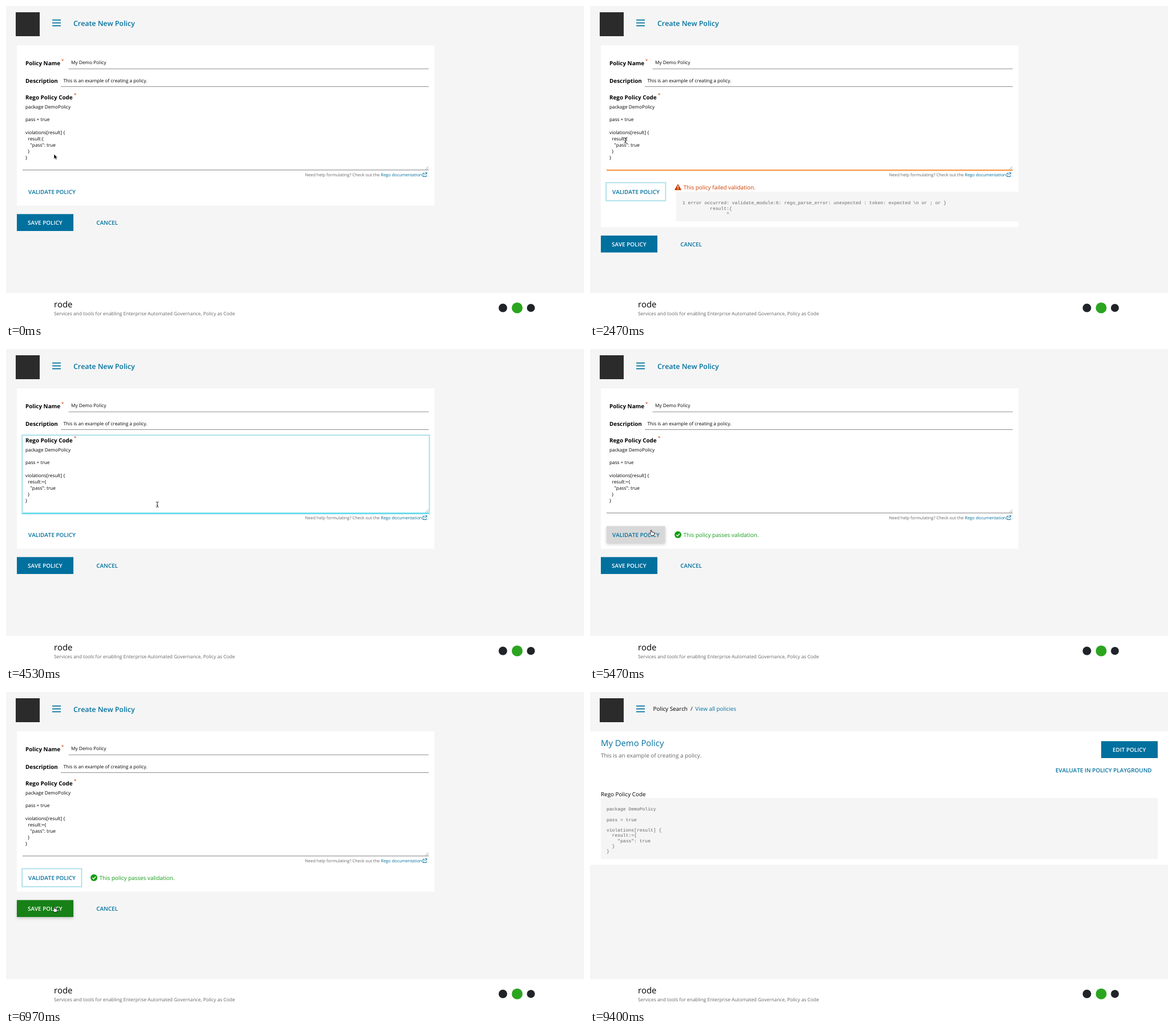
An HTML page that plays this animation: 1012 by 553 pixels, repeating every 9.51 s.

```html
<!DOCTYPE html>
<html lang="en">
<head>
<meta charset="utf-8">
<title>Create New Policy</title>
<style>
  html, body { margin: 0; height: 100%; overflow: hidden; background: #f5f5f5; }
  svg { display: block; width: 100vw; height: 100vh; }
  text { font: 9.89px "Open Sans", sans-serif; font-kerning: none; white-space: pre; text-rendering: geometricPrecision; }
  .label { font-weight: 700; }
  .button { font-weight: 600; }
  .title { font-size: 12.36px; font-weight: 600; }
  .large { font-size: 14.83px; }
  .input { font-size: 8.24px; }
  .hint { font-size: 7.42px; }
  .tagline { font-size: 8.4px; }
  .code { font: 8.03px "Liberation Mono", monospace; }
  .raised { filter: drop-shadow(0 2.5px 2.5px rgba(0, 0, 0, .2)); }
</style>
</head>
<body>
<svg id="stage" viewBox="0 0 1012 553"></svg>
<script>
const DURATION = 9510;
const BLUE = '#00709e', GREY = '#666', RED = '#cc3d00', GREEN = '#149b14', RING = '#a9dfea', RULE = '#808080';

// Moments of the interaction, in ms
const FAILED = 850, FOCUSED = 2650, EDITED = 3400, BLURRED = 5300, PASSED = 5400, SAVED = 7250, CURSOR_GONE = 8400;

// Pointer path: time, x, y
const path = [
  [0, 84, 260], [150, 84, 260], [650, 87, 324], [1880, 87, 324], [2400, 62, 236], [3650, 62, 236],
  [4250, 265, 273], [4560, 265, 273], [5180, 107, 319], [5920, 107, 319], [6550, 84, 378], [DURATION, 84, 378]
];

const text = (x, y, content, cls = '', fill = '#000') =>
  `<text x="${x}" y="${y}" class="${cls}" fill="${fill}">${content}</text>`;
const rect = (x, y, w, h, fill, extra = '') =>
  `<rect x="${x}" y="${y}" width="${w}" height="${h}" fill="${fill}" ${extra}/>`;
const stroke = (d, color, width = 1) =>
  `<path d="${d}" fill="none" stroke="${color}" stroke-width="${width}"/>`;
const dot = (x, y, r, fill) => `<circle cx="${x}" cy="${y}" r="${r}" fill="${fill}"/>`;
const group = (id, content) => `<g id="${id}">${content}</g>`;
const lines = (x, y, step, rows, cls, fill) =>
  rows.map((row, i) => row && text(x, y + i * step, row, cls, fill)).join('');
const policy = assign => ['package DemoPolicy', '', 'pass = true', '', 'violations[result] {',
  `  result${assign}{`, '    "pass": true', '  }', '}'];

const header = rect(17, 11, 42, 42, '#2b2b2b') + stroke('M81 24.7H96M81 29.7H96M81 34.7H96', BLUE, 1.8);

const footer = rect(0, 504, 1012, 49, '#fff') +
  text(84, 529.3, 'rode', 'large') +
  text(84, 543, 'Services and tools for enabling Enterprise Automated Governance, Policy as Code', 'tagline', GREY) +
  dot(870, 530, 7.5, '#202428') + dot(895, 530, 9.5, '#2ba51f') + dot(919, 530, 7, '#202428');

const failure =
  `<path d="M154 313.5L159.2 322.5H148.8Z" fill="${RED}" stroke="${RED}" stroke-width="1.3" stroke-linejoin="round"/>` +
  stroke('M154 315.5V319.5M154 320.5V322', '#fff', 1.3) +
  text(163.5, 322.2, 'This policy failed validation.', '', RED) +
  rect(151, 326, 599, 52, '#f5f5f5') +
  lines(162, 348.3, 9.27, [
    '1 error occurred: validate_module:6: rego_parse_error: unexpected : token: expected \\n or ; or }',
    '          result:{', '                ^'], 'code', GREY);

const success = dot(154, 326, 6, GREEN) + stroke('M151.2 326.2L153.3 328.2L157 324.2', '#fff', 1.5) +
  text(163.5, 329.5, 'This policy passes validation.', '', GREEN);

const form = text(118, 34.5, 'Create New Policy', 'title', BLUE) +
  rect(19, 69, 731, 281.5, '#fff', 'id="card"') +
  text(34, 103.6, 'Policy Name', 'label') + text(96.7, 99.4, '*', 'input', RED) +
  text(114, 102.4, 'My Demo Policy', 'input') +
  text(34, 135.2, 'Description', 'label') +
  text(100.5, 133.9, 'This is an example of creating a policy.', 'input') +
  stroke('M109.5 110.3H740M96 141.5H740', RULE, .9) +
  text(34, 163.6, 'Rego Policy Code', 'label') + text(118.7, 159.4, '*', 'input', RED) +
  group('before', lines(34, 180.1, 11.12, policy(':'), 'input')) +
  group('after', lines(34, 180.1, 11.12, policy(':='), 'input')) +
  stroke('M734.5 287L739.5 282M737.5 287L739.5 285', '#777', .7) +
  group('focus', rect(28.3, 151.3, 713, 138, 'none', `stroke="${RING}" stroke-width="2"`)) +
  rect(29, 287.4, 711, 1, RULE, 'id="underline"') +
  rect(0, 228.5, .7, 9, '#000', 'id="caret"') +
  text(523.5, 298.7, 'Need help formulating? Check out the', 'hint', GREY) +
  text(656.3, 298.7, 'Rego documentation', 'hint', BLUE) +
  stroke('M733 293.5H730V299.5H736V297M732.5 297L736.7 292.8M734 292.7H736.8V295.5', BLUE, 1) +
  text(738, 298.7, '.', 'hint', GREY) +
  group('failure', failure) + group('success', success) +
  group('ring', rect(28.2, 310.2, 104.2, 31.6, 'none', `stroke="${RING}" stroke-width="1.8"`)) +
  rect(29, 311, 102.5, 29.7, '#d8d8d8', 'id="validateHover" class="raised"') +
  text(39, 329.5, 'VALIDATE POLICY', 'button', BLUE) +
  group('actions', rect(19, 365.3, 99, 29.7, BLUE, 'id="save"') +
    text(38, 383.9, 'SAVE POLICY', 'button', '#fff') + text(158.3, 383.9, 'CANCEL', 'button', BLUE));

const detail = text(110.5, 33.4, 'Policy Search') + text(176, 33.4, '/') +
  text(184.3, 33.4, 'View all policies', '', BLUE) +
  rect(0, 69, 1012, 234.5, '#fff') +
  text(19, 95, 'My Demo Policy', 'large', BLUE) +
  text(19, 114.7, 'This is an example of creating a policy.', '', GREY) +
  rect(895, 86.3, 99, 29.7, BLUE) + text(915, 104.9, 'EDIT POLICY', 'button', '#fff') +
  text(815, 141.3, 'EVALUATE IN POLICY PLAYGROUND', 'button', BLUE) +
  text(19, 182.6, 'Rego Policy Code') +
  rect(19, 186, 975, 107.5, '#f5f5f5') +
  lines(29, 208.1, 9.27, policy(':='), 'code', GREY);

const arrow = '<path d="M0 0V8.6L2 6.8L3.4 9.8L4.9 9.1L3.6 6.2H6.2Z" fill="#000" stroke="#fff" stroke-width=".6"/>';
const beam = stroke('M-2.3 -4.5Q0 -4.5 0 -3.2Q0 -4.5 2.3 -4.5M0 -3.5V3.5M-2.3 4.5Q0 4.5 0 3.2Q0 4.5 2.3 4.5M-1.2 1.5H1.2', '#222', 1);
const hand = '<path d="M-.8 3V-.6Q0 -1.6 .8 -.6V2L5 3Q6 3.5 5.6 5.5L4.8 8.5H.3L-2.4 4.8Q-2.4 3.4 -.8 4.6Z" ' +
  'fill="#fff" stroke="#000" stroke-width=".8"/>';

document.getElementById('stage').innerHTML = rect(0, 0, 1012, 553, '#f5f5f5') + header +
  group('form', form) + group('detail', detail) + footer +
  group('cursor', group('arrow', arrow) + group('beam', beam) + group('hand', hand));

const el = id => document.getElementById(id);
const show = (id, visible) => el(id).setAttribute('display', visible ? 'inline' : 'none');

function pointerAt(t) {
  const i = path.findIndex(([time]) => time > t);
  const [t0, x0, y0] = path[i - 1], [t1, x1, y1] = path[i];
  const p = (t - t0) / (t1 - t0), ease = p * p * (3 - 2 * p);
  return [x0 + (x1 - x0) * ease, y0 + (y1 - y0) * ease];
}

function render(t) {
  const [x, y] = pointerAt(t);
  const inside = (left, top, right, bottom) => x > left && x < right && y > top && y < bottom;
  const failed = t >= FAILED && t < EDITED, focused = t >= FOCUSED && t < BLURRED;
  const edited = t >= EDITED, saved = t >= SAVED;
  const overValidate = inside(29, 311, 131, 341);
  const overSave = t > PASSED && inside(19, 365, 118, 395);
  const overCode = t > 150 && inside(29, 151, 740, 289);
  const pointing = !saved && (overValidate || overSave);

  show('form', !saved);
  show('detail', saved);
  show('before', !edited);
  show('after', edited);
  show('failure', failed);
  show('success', t >= PASSED);
  show('focus', focused);
  show('caret', focused && t % 1000 < 500);
  show('validateHover', overValidate);
  show('ring', !overValidate && (t >= FAILED && t < FOCUSED || t >= BLURRED));

  el('caret').setAttribute('x', edited ? 67 : 62.3);
  el('card').setAttribute('height', failed ? 319 : 281.5);
  el('actions').setAttribute('transform', `translate(0 ${failed ? 37.7 : 0})`);
  el('underline').setAttribute('fill', focused ? '#42d8e8' : failed ? '#f5821f' : RULE);
  el('underline').setAttribute('height', focused || failed ? 1.8 : 1);
  el('save').setAttribute('fill', overSave ? '#178017' : BLUE);
  el('save').setAttribute('class', overSave ? 'raised' : '');

  show('cursor', t < CURSOR_GONE);
  show('hand', pointing);
  show('beam', !saved && overCode);
  show('arrow', saved || !pointing && !overCode);
  el('cursor').setAttribute('transform', `translate(${x} ${y})`);
}

const start = performance.now();
function tick() {
  render((performance.now() - start) % DURATION);
  requestAnimationFrame(tick);
}
tick();
</script>
</body>
</html>
```
